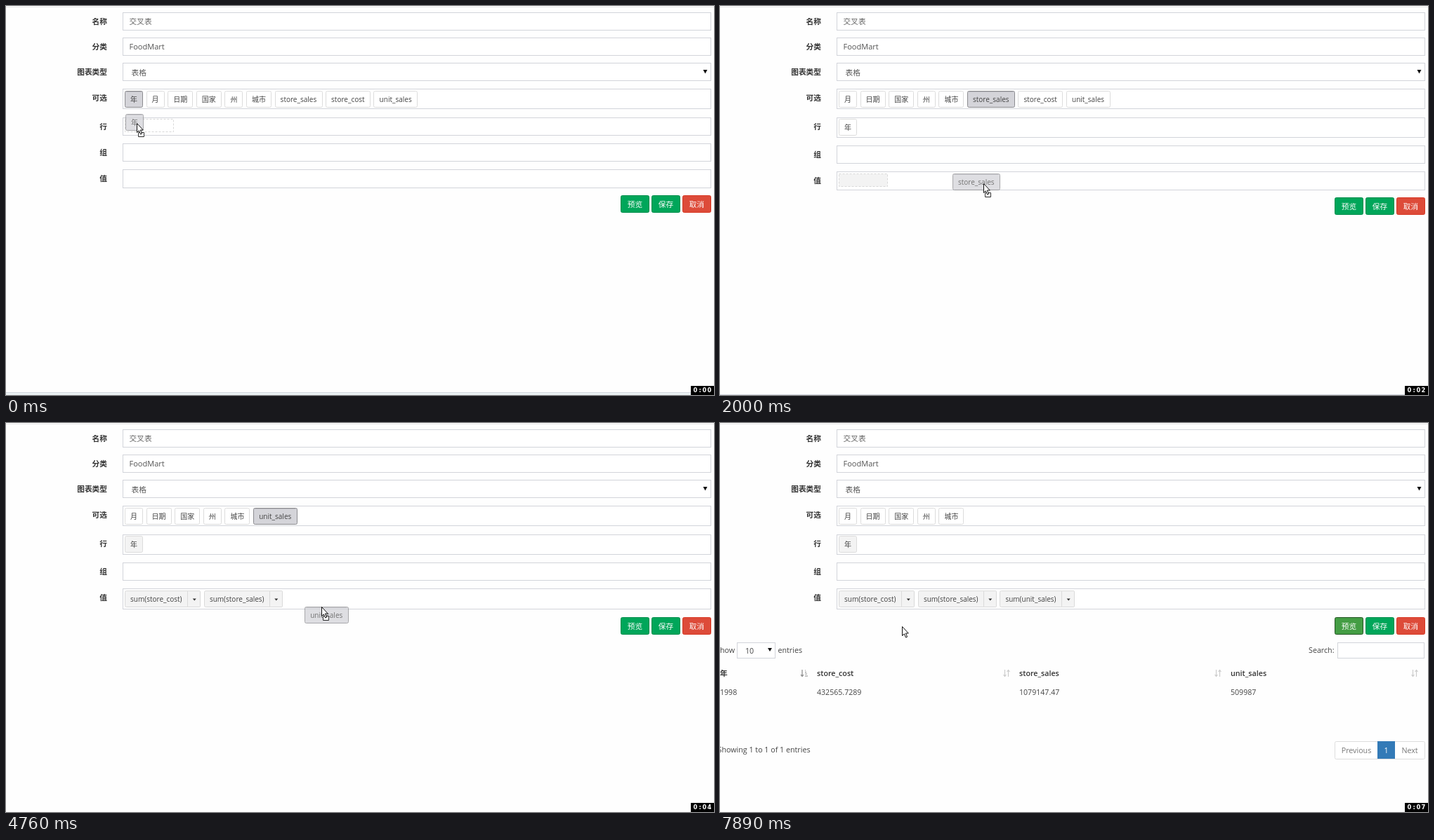
An HTML page for the animation above (8 s loop, 1008 by 555 pixels).

```html
<!DOCTYPE html>
<html lang="zh-CN">
<head>
<meta charset="utf-8">
<style>
html, body { margin: 0; width: 100%; height: 100%; overflow: hidden; background: #fefefe; }
svg { display: block; font-family: 'Open Sans', 'Noto Sans CJK SC', 'Noto Sans CJK', sans-serif; }
</style>
</head>
<body>
<svg id="stage" width="1008" height="555" viewBox="0 0 1008 555"></svg>
<script>
const LOOP = 8000;
const stage = document.getElementById('stage');

// Moments at which the picture may change: [first, last, count]
const stamps = [0, ...[
  [160, 1090, 8], [1210, 1330, 2], [1630, 2000, 4], [2120, 2660, 5], [2780, 3430, 5],
  [3580, 3730, 2], [3880, 4760, 8], [4910, 4910, 1], [5190, 6230, 9], [6330, 6480, 2],
  [6790, 7060, 3], [7340, 7340, 1], [7740, 7890, 2]
].flatMap(([a, b, n]) => Array.from({ length: n }, (_, i) => Math.round(a + (b - a) * i / Math.max(1, n - 1))))];

// Pointer keys: time, x, y, cursor, offset of the dragged chip
const pointerKeys = [
  [0, 186, 167, 'drag', -16, -13],
  [160, 188, 170, 'drag', -16, -13],
  [290, 190, 171, 'arrow'],
  [820, 400, 132, 'hand'],
  [950, 398, 142, 'drag', -36, -18],
  [1210, 383, 219, 'drag', -41, -26],
  [1330, 382, 221, 'drag', -41, -26],
  [1620, 382, 222, 'drag', -41, -26],
  [2000, 375, 253, 'drag', -44, -14],
  [2120, 376, 254, 'arrow'],
  [2530, 392, 134, 'hand'],
  [2780, 390, 155, 'drag', -40, -16],
  [3100, 383, 250, 'drag', -40, -14],
  [3260, 386, 247, 'arrow'],
  [3430, 388, 243, 'hand'],
  [3580, 389, 225, 'arrow'],
  [4130, 385, 131, 'hand'],
  [4380, 390, 142, 'drag', -28, -12],
  [4760, 449, 262, 'drag', -24, 0],
  [4910, 448, 256, 'drag', -24, -4],
  [5190, 450, 256, 'arrow'],
  [6050, 893, 284, 'hand'],
  [6230, 893, 285, 'hand'],
  [6480, 432, 289, 'hand'],
  [7060, 425, 289, 'arrow'],
  [7730, 425, 289, 'arrow'],
  [7890, 259, 290, 'arrow']
];

const drags = [
  { name: '年', press: 0, drop: 290 },
  { name: 'store_sales', press: 820, drop: 2120 },
  { name: 'store_cost', press: 2640, drop: 3260 },
  { name: 'unit_sales', press: 4250, drop: 5190 }
];
const fields = ['年', '月', '日期', '国家', '州', '城市', 'store_sales', 'store_cost', 'unit_sales'];
const latinWidths = { store_sales: 67.6, store_cost: 64, unit_sales: 62.5 };
const chipWidth = name => latinWidths[name] || 16 + 10 * name.length;
const secondStarts = [950, 1870, 3100, 4250, 5310, 6330, 7340];

const rect = (x, y, w, h, fill, stroke = 'none', r = 0, extra = '') =>
  `<rect x="${Math.round(x) + .5}" y="${Math.round(y) + .5}" width="${Math.round(w) - 1}" height="${Math.round(h) - 1}" rx="${r}" fill="${fill}" stroke="${stroke}" ${extra}/>`;
const fillRect = (x, y, w, h, fill) => `<rect x="${x}" y="${y}" width="${w}" height="${h}" fill="${fill}"/>`;
const text = (x, y, str, { size = 10.7, fill = '#444', anchor = 'start', weight = 400 } = {}) =>
  `<text x="${x}" y="${y}" font-size="${size}" fill="${fill}" text-anchor="${anchor}" font-weight="${weight}">${str}</text>`;
const caret = (x, y, w, h, fill) => `<path d="M${x - w / 2} ${y}h${w}l${-w / 2} ${h}z" fill="${fill}"/>`;
const field = (y, h) => rect(166, y, 838, h, '#fff', '#d2d4da');
const label = (str, y) => text(144, y + 16.7, str, { anchor: 'end', weight: 700, fill: '#333' });
const placeholder = (x, y, fill = 'none') => rect(x, y, 70, 19, fill, '#d8d8d8', 0, 'stroke-dasharray="3 2"');

function chip(x, y, name, fill, active) {
  const w = chipWidth(name);
  return rect(x, y, w, 24, active ? '#d4d4d9' : fill, active ? '#8c8c90' : '#dcdcdc', 2) +
    (active ? `<path d="M${x + 2} ${y + 1.5}h${w - 4}" stroke="#b8b8be"/>` : '') +
    text(x + w / 2, y + 15.8, name, { size: 10, anchor: 'middle' });
}

function valueChip(x, y, name, active) {
  const w = chipWidth(name) + 44.3, split = x + w - 19;
  return rect(x, y, w, 24, '#f3f3f3', '#dadada', 2) +
    rect(split, y, 19, 24, active ? '#d4d4d9' : '#f3f3f3', active ? '#8c8c90' : '#dadada', 1) +
    text(x + 8, y + 15.8, `sum(${name})`, { size: 10 }) +
    caret(x + w - 9, y + 11.5, 5, 3, '#333');
}

function chipRow(names, draw, extraWidth) {
  let x = 169;
  return names.map(name => {
    const part = draw(x, name);
    x += chipWidth(name) + extraWidth + 4.6;
    return part;
  }).join('');
}

function button(x, y, str, fill, border) {
  return rect(x, y, 41, 25, fill, border, 2) +
    text(x + 20.5, y + 16.5, str, { fill: '#fff', anchor: 'middle' });
}

function sortIcon(x, active) {
  const color = active ? '#888' : '#ccc';
  const arrows = active
    ? 'M-3 -5V4M-5 2l2 2.5L-1 2M1 -4h1M1 -1.5h2M1 1h3M1 4h4'
    : 'M-2.5 -5V4M-4.5 2l2 2.5L-.5 2M2.5 5V-4M.5 -2l2 -2.5L4.5 -2';
  return `<path transform="translate(${x} 357)" d="${arrows}" fill="none" stroke="${color}" stroke-width="1.2"/>`;
}

function resultTable() {
  const columns = [[0, '年', '1998', 120], [138, 'store_cost', '432565.7289', 408],
    [426, 'store_sales', '1079147.47', 709], [727, 'unit_sales', '509987', 989]];
  return text(21, 327.5, 'Show', { anchor: 'end' }) +
    rect(24, 313, 55, 23, '#fff', '#d2d4da') + text(36, 329, '10') + caret(71, 321, 6, 5, '#111') +
    text(82.5, 327.5, 'entries') + text(874.5, 327.5, 'Search:', { anchor: 'end' }) +
    rect(879, 313, 124, 23, '#fff', '#d2d4da') +
    columns.map(([x, head, value, icon], i) =>
      text(x, 361, head, { weight: 600, fill: '#333' }) + text(x, 388, value, { size: 10.6 }) + sortIcon(icon, !i)).join('') +
    text(128.5, 469.5, 'Showing 1 to 1 of 1 entries', { anchor: 'end' }) +
    rect(875, 454, 129, 26, '#fff', '#ddd', 2) + fillRect(936, 454, 25, 25, '#337ab7') +
    text(906, 470.5, 'Previous', { anchor: 'middle', fill: '#777' }) +
    text(948.5, 470.5, '1', { anchor: 'middle', fill: '#fff' }) +
    text(982, 470.5, 'Next', { anchor: 'middle', fill: '#777' });
}

function pointerAt(t) {
  const i = pointerKeys.findLastIndex(key => key[0] <= t);
  const a = pointerKeys[i], b = pointerKeys[i + 1] || a;
  const p = a === b ? 0 : (t - a[0]) / (b[0] - a[0]);
  const mix = k => Math.round(a[k] + ((b[k] ?? a[k]) - a[k]) * p);
  return { x: mix(1), y: mix(2), kind: a[3], dx: mix(4), dy: mix(5) };
}

function cursor({ x, y, kind }) {
  const shape = kind === 'hand'
    ? 'M-1.6 1.5q1.4-1.8 2.8 0v5q1.5-1 2.4 .6q1.5-.6 2.1 .8q1.7-.3 1.8 1.4v3.2l-1.8 3.5v2h-7v-2l-4.3-5.2q-.6-1.6 1-1.7l3 2.2z'
    : 'M.5 .5V13.5L3.3 10.8 5.6 16 7.6 15.1 5.4 10H9.3Z';
  const knuckles = kind === 'hand' ? '<path d="M1.2 6v4M3.6 7.5v3M5.7 8.5v2.5" stroke="#111" stroke-width=".9"/>' : '';
  const badge = kind === 'drag' ? '<path d="M2.5 13.5h8v6h-8z" fill="#fff" stroke="#333"/><path d="M3 19.5h7" stroke="#222" stroke-dasharray="1 1"/>' : '';
  return `<g transform="translate(${x} ${y})">${badge}<path d="${shape}" fill="#fff" stroke="#111"/>${knuckles}</g>`;
}

function timer(t) {
  const seconds = secondStarts.filter(start => start <= t).length;
  return fillRect(975, 542, 33, 13, '#000') +
    `<text x="978.5 986.5 991.5 998.5" y="551" font-family="'DejaVu Sans', sans-serif" font-weight="700" font-size="8.4" fill="#fff">0:0${seconds}</text>`;
}

function placeholders(t, rowY, groupY, valueY) {
  if (t < 290) return placeholder(169, rowY + 2);
  if (t >= 1080 && t < 1330) return placeholder(562, 124) + placeholder(202, rowY + 5) + placeholder(169, groupY + 3);
  if (t >= 1330 && t < 1750) return placeholder(169, groupY + 3);
  if (t >= 1870 && t < 2120) return placeholder(169, valueY + 3, '#f3f3f3');
  if (t >= 4910 && t < 5190) return placeholder(400, valueY + 6, '#f3f3f3');
  return '';
}

function scene(t) {
  const dropped = drags.filter(d => t >= d.drop).map(d => d.name);
  const held = drags.find(d => t >= d.press && t < d.drop)?.name;
  const rowGrown = dropped.includes('年'), valueGrown = dropped.length > 1;
  const groupY = rowGrown ? 199 : 196, valueY = groupY + 37;
  const buttonY = valueY + (valueGrown ? 41 : 37);
  const bottomY = buttonY + 281;
  const availableFill = t >= 2780 && t < 3880 ? '#f3f3f3' : '#fff';
  const values = ['store_cost', 'store_sales', 'unit_sales'].filter(name => dropped.includes(name));
  const pointer = pointerAt(t);
  const preview = t < 6100 ? ['#00a65a', '#008d4c'] : t < 6790 ? ['#398439', '#3f7fa5'] : ['#449d44', '#255625'];

  let out = fillRect(0, 0, 1008, 555, '#fefefe') + fillRect(0, 1, 1008, 1, '#e9e9e9') +
    fillRect(0, bottomY, 1008, 1, '#d2d6de') + fillRect(0, bottomY + 1, 1008, 10, '#ecf2f4');
  const rows = [['名称', 9, 26], ['分类', 45, 26], ['图表类型', 81, 26], ['可选', 118, 29],
    ['行', 159, rowGrown ? 29 : 26], ['组', groupY, 26], ['值', valueY, valueGrown ? 30 : 27]];
  for (const [name, y, h] of rows) out += label(name, y) + field(y, h);
  out += text(175.5, 25.5, '交叉表', { fill: '#666' }) + text(175.5, 62, 'FoodMart', { size: 11, fill: '#555' }) +
    text(178.5, 98.5, '表格', { fill: '#555' }) + caret(995.5, 91, 6, 5.5, '#111');

  out += placeholders(t, 159, groupY, valueY);
  out += chipRow(fields.filter(name => !dropped.includes(name)),
    (x, name) => chip(x, 121, name, availableFill, name === held), 0);
  if (rowGrown) out += chip(169, 161, '年', t < 2120 ? '#fff' : '#f3f3f3');
  out += chipRow(values, (x, name) =>
    valueChip(x, valueY + 3, name, name === 'store_sales' && t >= 3430 && t < 3580), 44.3);

  out += button(875, buttonY, '预览', ...preview) + button(919, buttonY, '保存', '#00a65a', '#008d4c') +
    button(963, buttonY, '取消', '#dd4b39', '#d73925');
  if (t >= 6790) out += resultTable();
  if (pointer.kind === 'drag')
    out += `<g opacity=".75">${chip(pointer.x + pointer.dx, pointer.y + pointer.dy, held, '#fff', true)}</g>`;
  return out + cursor(pointer) + timer(t);
}

let shown = -1;
function tick() {
  const now = performance.now() % LOOP;
  const t = stamps.findLast(stamp => stamp <= now);
  if (t !== shown) {
    stage.innerHTML = scene(t);
    shown = t;
  }
  requestAnimationFrame(tick);
}
tick();
</script>
</body>
</html>
```
